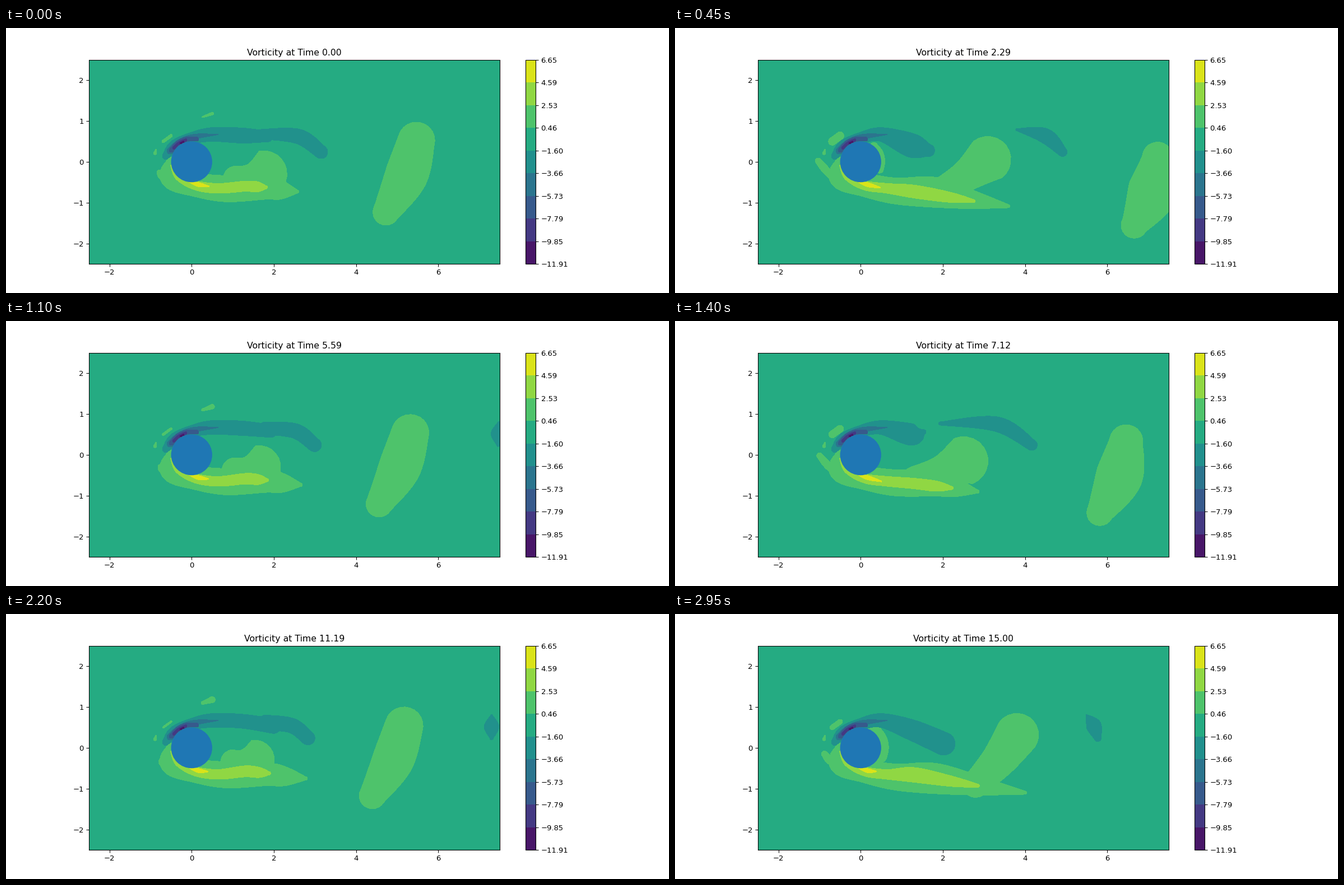
A matplotlib script that plays this animation: 1183x473 px, repeating every 3 s.

```python
import matplotlib.pyplot as plt
import numpy as np
from matplotlib.animation import FuncAnimation
from matplotlib.patches import Circle, Polygon

FRAMES, INTERVAL, T_END = 60, 50, 15.0
PERIOD = 5.8                                # vortex shedding period
LEVELS = np.linspace(-11.914, 6.6505, 10)
TEAL, GREEN, LIME, YELLOW = 4, 6, 7, 8      # contour bands

fig = plt.figure(figsize=(12.5, 4.998), dpi=94.64)
ax = fig.add_subplot()
calm = ax.contourf([-2.5, 7.5], [-2.5, 2.5], np.full((2, 2), -0.5), LEVELS)
bar = fig.colorbar(calm)
bar.set_ticks(LEVELS, labels=[f"{v:.2f}".replace("-", "\u2212") for v in LEVELS])
title = ax.set_title("")


def swing(t, mean, amp, peak=0.0):
    """Oscillation with the shedding period, highest at time peak."""
    return mean + amp * np.cos(2 * np.pi * (t - peak) / PERIOD)


def lerp(a, b, w):
    return a + (b - a) * w


def ribbon(*knots):
    """Outline of a round-ended band through knots (x, y, half width)."""
    k = np.array([knots[0], *knots, knots[-1]], float)
    u = np.linspace(0, len(knots) - 1, 70)
    j = np.minimum(u.astype(int), len(knots) - 2)
    s = (u - j)[:, None]
    p0, p1, p2, p3 = (k[j + i] for i in range(4))
    c = p1 + s / 2 * (p2 - p0 + s * (2 * p0 - 5 * p1 + 4 * p2 - p3
                                     + s * (3 * (p1 - p2) + p3 - p0)))
    dx, dy = np.gradient(c[:, :2], axis=0).T
    way = np.unwrap(np.arctan2(dy, dx))
    turn = np.linspace(np.pi / 2, -np.pi / 2, 13)
    angle = np.concatenate([way + np.pi / 2, way[-1] + turn,
                            way[::-1] - np.pi / 2, way[0] + turn + np.pi])
    base = np.concatenate([c, np.repeat(c[-1:], 13, 0), c[::-1], np.repeat(c[:1], 13, 0)])
    r = np.maximum(base[:, 2], 0)
    return base[:, :2] + np.column_stack([r * np.cos(angle), r * np.sin(angle)])


def arc(start, end, radius, half):
    """Band around the cylinder between two angles in degrees."""
    return ribbon(*[(radius * np.cos(a), radius * np.sin(a), half)
                    for a in np.radians(np.linspace(start, end, 4))])


# ---- shapes that stay at the cylinder, as functions of time ----

def front_spot(t):
    r = swing(t, 0.055, 0.04, 2.0)
    return ribbon((-0.69, 0.5, r), (-0.5, 0.64, r))


def far_spot(t):
    return ribbon((-0.89, 0.21, 0.035), (-0.87, 0.29, 0.015))


def top_spot(t):
    r = swing(t, -0.12, 0.2, 5.15)
    return ribbon((0.27, 1.1, r / 2), (0.5, 1.18, r))


def tongue(t):
    w = np.clip(swing(t, 0.45, 0.5, 2.0), 0, 1)
    x, y = lerp(-0.72, -1.06, w), lerp(-0.33, 0.05, w)
    return ribbon((x, y, 0.07), ((x - 0.7) / 2, (y - 0.38) / 2, 0.09), (-0.7, -0.35, 0.09))


def rear(t):
    return arc(50, -22, 0.5, swing(t, 0.04, 0.14, 3.4))


def lower_layer(t):
    tip = swing(t, 3.25, 0.75, 3.3)
    return ribbon((-0.5, 0, 0.12), (-0.48, -0.36, 0.29), (0.1, -0.56, 0.29),
                  (0.85, swing(t, -0.69, 0.03), 0.32),
                  (1.8, swing(t, -0.7, 0.06), swing(t, 0.33, -0.05)),
                  ((1.8 + tip) / 2, swing(t, -0.82, 0.13), 0.23),
                  (tip, swing(t, -0.93, 0.2), 0.04))


def lime_core(t):
    tip = swing(t, 2.35, 0.55, 3.0)
    y, y_tip = swing(t, -0.65, 0.08, 5.0), swing(t, -0.8, 0.18, 5.6)
    return ribbon((-0.48, -0.1, 0.03), (-0.34, -0.39, 0.05), (0.1, -0.58, 0.11),
                  (0.65, -0.65, 0.12), (1.3, y, swing(t, 0.15, 0.03, 3.5)),
                  (lerp(1.3, tip, 0.6), lerp(y, y_tip, 0.6), 0.125), (tip, y_tip, 0.04))


def yellow_peak(t):
    tip = swing(t, 0.42, 0.08, 1.45)
    return ribbon((-0.05, -0.49, 0.01), (0.17, -0.56, 0.05), (tip, -0.35 - 0.6 * tip, 0.012))


def upper_layer(t):
    return ribbon((-0.63, 0.14, 0.08), (-0.42, 0.38, 0.14), (-0.02, 0.57, 0.14),
                  (0.5, 0.67, 0.17),
                  (1.25, swing(t, 0.52, 0.13, 5.5), swing(t, 0.23, -0.06, 5.15)),
                  (swing(t, 1.85, 0.33, 4.35), swing(t, 0.38, 0.28, 0.5),
                   swing(t, 0.18, 0.12, 3.95)))


# ---- vortices that grow, break off and drift, as functions of age ----

def lower_vortex(a):
    x = 1.75 + 0.55 * a + 0.0157 * a**2
    y = 0.12 + 0.42 * np.cos(2 * np.pi * (a - 5.3) / 11)
    foot = x - np.interp(a, [-1.7, 1.5, 5, 9], [0, 1.25, 0.8, 0.5])
    y_foot = -0.42 - 0.14 * a
    return ribbon((foot, y_foot, 0.32),
                  ((foot + x) / 2 + 0.02 * a, (y_foot + y) / 2, 0.3 + 0.037 * a),
                  (x, y, min(0.57 + 0.2 * a, 0.64 - 0.033 * a)))


def upper_vortex(a):
    x, y = 3.15 + 0.77 * a, 0.24
    length = 1.9 * np.exp(-((a - 1.1) / 1.3)**2) + 0.5 * (1 - a / 5.4)
    y_tail = 0.8 - 0.12 * np.exp(-a)
    return ribbon((x - length, y_tail, 0.02 + 0.1 * np.exp(-1.2 * a)),
                  (x - 0.38 * length, (y + y_tail) / 2 + 0.11 * length, 0.18),
                  (x, y, 0.16 - 0.022 * a))


def patch(band):
    color = plt.cm.viridis((band + 0.5) / 9)
    return ax.add_patch(Polygon(np.zeros((3, 2)), fc=color, lw=0, aa=False, zorder=3))


class Attached:
    def __init__(self, band, shape):
        self.shape, self.patch = shape, patch(band)

    def draw(self, t):
        self.patch.set_xy(self.shape(t))


class Shed:
    """One vortex per period, each alive between two ages."""

    def __init__(self, band, shape, first, last):
        self.shape, self.first, self.last = shape, first, last
        self.patches = {k: patch(band) for k in range(-1, 3)}

    def draw(self, t):
        for k, p in self.patches.items():
            age = t - k * PERIOD
            p.set_visible(self.first <= age <= self.last)
            if p.get_visible():
                p.set_xy(self.shape(age))


layers = [Attached(GREEN, shape) for shape in
          (front_spot, far_spot, top_spot, tongue, rear, lower_layer)]
layers += [Shed(GREEN, lower_vortex, -1.7, 9.17),
           Attached(LIME, lime_core), Attached(YELLOW, yellow_peak),
           Attached(TEAL, upper_layer), Shed(TEAL, upper_vortex, -1.2, 5.75)]

# steady dark bands on the upper left of the cylinder
patch(3).set_xy(ribbon((-0.52, 0.27, 0.08), (-0.25, 0.49, 0.08),
                       (0.1, 0.62, 0.06), (0.64, 0.67, 0.005)))
patch(2).set_xy(arc(150, 78, 0.57, 0.05))
patch(1).set_xy(arc(142, 105, 0.55, 0.03))
patch(0).set_xy(arc(120, 112, 0.53, 0.015))
ax.add_patch(Circle((0, 0), 0.5, zorder=4))


def update(i):
    t = T_END * i / (FRAMES - 1)
    title.set_text(f"Vorticity at Time {t:.2f}")
    for layer in layers:
        layer.draw(t)


anim = FuncAnimation(fig, update, frames=FRAMES, interval=INTERVAL, repeat=True)
plt.show()
```
